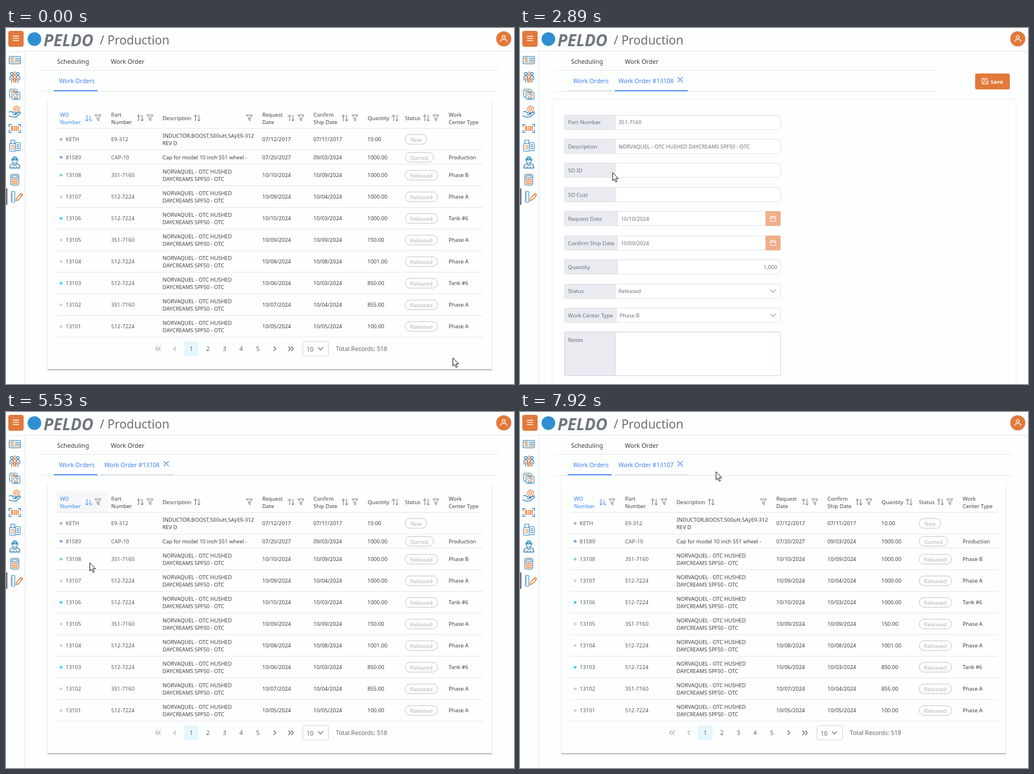
An HTML page that plays this animation: 894 px wide and 626 px high, repeating every 8000 ms.

```html
<!DOCTYPE html>
<html lang="en">
<head>
<meta charset="utf-8">
<title>Production</title>
<style>
html, body { margin: 0; width: 100%; height: 100%; overflow: hidden; background: #fdfefe; }
svg { display: block; width: 894px; height: 626px; font-family: "Noto Sans", "Open Sans", sans-serif; }
text { font-size: 9.4px; fill: #3a4047; }
.brand { font-size: 28.6px; font-weight: 800; font-style: italic; fill: #71757d; }
.title { font-size: 21.2px; fill: #6b6f77; }
.nav { font-size: 10.8px; font-weight: 500; fill: #343b44; }
.tab { font-size: 10.5px; font-weight: 500; fill: #3b82f6; }
.head { font-size: 9.4px; font-weight: 500; fill: #3d444d; }
.sorted { fill: #3b82f6; }
.code { font-size: 9.5px; fill: #565c64; }
.date { font-size: 9.5px; }
.badge { font-size: 9.3px; font-weight: 500; fill: #b0b2b5; }
.page { font-size: 10.6px; fill: #62686f; }
.label { font-size: 9.5px; font-weight: 500; fill: #666d77; }
.value { font-size: 9.3px; font-weight: 300; fill: #6c727a; }
.save { font-size: 9.6px; font-weight: 600; fill: #fff; }
</style>
</head>
<body>
<svg viewBox="0 0 894 626">
  <g id="shell"></g>
  <g id="view"></g>
  <g id="cursor"></g>
</svg>
<script>
const LOOP = 8000;
const BLUE = '#3b82f6', ORANGE = '#e2793b', RULE = '#e5e7ea';
const INK = '#2480ba', WARM = '#e57f3c';

const $ = id => document.getElementById(id);
const text = (x, mid, str, cls = '', extra = '') =>
  `<text x="${x}" y="${mid + 3.5}" class="${cls}" ${extra}>${str}</text>`;
const rect = (x, y, w, h, fill, rx = 0, stroke = 'none') =>
  `<rect x="${x}" y="${y}" width="${w}" height="${h}" rx="${rx}" fill="${fill}" stroke="${stroke}"/>`;
const line = (d, color = RULE, width = 1, fill = 'none') =>
  `<path d="${d}" stroke="${color}" stroke-width="${width}" fill="${fill}" stroke-linecap="round" stroke-linejoin="round"/>`;
const dot = (x, y, r, fill, stroke = 'none') =>
  `<circle cx="${x}" cy="${y}" r="${r}" fill="${fill}" stroke="${stroke}" stroke-width="1.2"/>`;
const at = (x, y, body) => `<g transform="translate(${x} ${y})">${body}</g>`;
const middle = 'text-anchor="middle"';

// Sidebar icons, each centred on 0,0
const person = (x, y, c) => dot(x, y - 6, 2.2, 'none', c) + line(`M${x - 3} 5V${y - 1}q3 -3 6 0V5M${x} 1V9`, c, 1.3);
const icons = [
  rect(-10, -6.5, 20, 13, '#e6f2f9', 1, INK) + dot(-5, -2, 2.2, 'none', WARM) + line('M1 -3H8M1 0H8', INK, 1.2) +
    line('M-7 4l3 -2 3 2M2 4V2M5 4V2M8 4V2', WARM, 1.4),
  person(-5.5, 0, INK) + person(5.5, 0, INK) + person(0, -1, WARM) + line('M-2 9V0M2 9V0', WARM, 1.5),
  rect(-9, -9, 13, 14, 'none', 1, INK) + rect(-5, -4, 14, 13, '#fdfefe', 1, INK) + dot(2, 1, 4, '#fff', WARM) +
    line('M2 -1V1H4M-2 7H6', INK, 1.2) + line('M-7 -6H1', WARM, 1.4),
  dot(3, -4, 5.5, 'none', WARM) + dot(3, -4, 2.4, 'none', WARM) +
    line('M-10 1l4 -1 4 3h4q2 2 -1 3h-4M1 5l7 -4q3 0 1 3l-7 6h-6l-6 -2', INK, 1.4),
  line('M-10 -3V-7H-6M6 -7H10V-3M10 3V7H6M-6 7H-10V3', INK, 1.4) + line('M-6 -4V4M-3.5 -4V4M0 -4V4M3 -4V4M6 -4V4', WARM, 1.7),
  rect(-9, -4, 11, 14, 'none', 1, INK) + rect(-7, -9.5, 7, 6, '#fdfefe', 0, INK) + rect(1, -5, 8.5, 14, '#fdfefe', 1, INK) +
    line('M-6 0H-1M-6 3H-1M-6 6H-1', WARM, 1.4) + line('M3.5 -1H7M3.5 2H7M3.5 5H7', INK, 1.3),
  dot(0, -3, 4.3, 'none', INK) + line('M-6 -5H6M-4 -5q0 -5 4 -5t4 5', INK, 1.4) +
    line('M-8.5 9.5V6q1 -3 5 -4l3.5 3 3.5 -3q4 1 5 4V9.5Z', INK, 1.4) + line('M-3 9V6M3 9V6', WARM, 1.3),
  rect(-7, -9.5, 14, 19, '#fbe9dd', 1.5, INK) + rect(-4.5, -7, 9, 3.5, '#fdfefe', 0, INK) +
    line('M-4 -.5h1m2.5 0h1m2.5 0h1M-4 3h1m2.5 0h1m2.5 0h1M-4 6.5h1m2.5 0h1m2.5 0h1', WARM, 2),
  rect(-6, -9.5, 6, 19, '#fdfefe', .8, INK) + line('M-6 -6h2M-6 -3h3M-6 0h2M-6 3h3M-6 6h2', INK) +
    line('M2 7l1 -4 8 -9 3 2.5 -8 9ZM9 -4l3 2.5', WARM, 1.4)
];

function shell() {
  let s = line('M0 41H894', '#e2e4e7') + line('M33.5 41V626', '#e2e4e7');
  s += rect(4, 5, 27, 28, ORANGE, 4) + line('M12.5 14.5h10M12.5 18.3h10M12.5 22.1h10', '#fff', 1.3);
  s += dot(50, 19.5, 12, '#2f8fd0');
  s += '<text x="66" y="31.5" class="brand">PELDO</text><text x="165" y="29" class="title">/ Production</text>';
  s += dot(876, 19, 13.3, ORANGE) + dot(876, 16, 2.7, 'none', '#fff') +
    line('M870.5 24v-1q0 -2.5 3 -2.5h5q3 0 3 2.5v1', '#fff', 1.2);
  icons.forEach((icon, i) => s += at(15.5, 56.5 + i * 30.03, icon));
  s += rect(0, 282, 2.5, 29, '#6f727b');
  return s + text(90, 59.5, 'Scheduling', 'nav') + text(184.5, 59.5, 'Work Order', 'nav');
}

const cross = (x, y) => line(`M${x - 4} ${y - 4}l8 8m0 -8l-8 8`, BLUE, 1.1);
const bar = (x, w, color) => rect(x, 109.4, w, 1.8, color);

function tabs({ form, open, hover }) {
  const right = form ? 733 : 867;
  const shade = (active, hovered) => active ? BLUE : hovered ? '#5d636d' : '#dcdfe4';
  let s = line(`M62 74.5H${right}M62 111.5H${right}`);
  s += text(93.5, 93.5, 'Work Orders', 'tab') + bar(84, 77, shade(!form, hover === 0));
  open.forEach((id, i) => {
    const x = 167 + i * 133;
    s += text(x + 6, 93.5, 'Work Order #' + id, 'tab') + cross(x + 115, 91) + bar(x, 128, shade(id === form, hover === i + 1));
  });
  return s;
}

const sort = x => line(`M${x - 3} 163.5V153m-2.5 2.5l2.5 -2.5 2.5 2.5M${x + 3} 153v10.5m-2.5 -2.5l2.5 2.5 2.5 -2.5`, '#646b76');
const funnel = x => line(`M${x - 5} 153h10l-3.7 5v5l-2.6 -1.5v-3.5Z`, '#646b76');
const columns = [
  [95, 'WO|Number', 0, 162], [185, 'Part|Number', 236.5, 253.5], [275.5, 'Description', 336.5, 428.5],
  [451, 'Request|Date', 502, 519], [541, 'Confirm|Ship Date', 596.5, 614], [636.5, 'Quantity', 685],
  [702, 'Status', 740, 756.5], [779, 'Work|Center Type']
];

const LOTION = 'NORVAQUEL - OTC HUSHED/DAYCREAMS SPF50 - OTC';
const GOLD = '351-7160', SILVER = '512-7224';
const orders = [
  ['KETH', 'E9-312', 'INDUCTOR,BOOST,500uH,5AýE9-312/REV D', '07/12/2017', '07/11/2017', '10.00', 'New', ''],
  ['81589', 'CAP-10', 'Cap for model 10 inch S51 wheel -', '07/20/2027', '09/03/2024', '1000.00', 'Started', 'Production'],
  ...[
    [GOLD, '10/10', '10/09', '1000.00', 'Phase B'], [SILVER, '10/09', '10/04', '1000.00', 'Phase A'],
    [SILVER, '10/10', '10/03', '1000.00', 'Tank #6'], [GOLD, '10/09', '10/09', '150.00', 'Phase A'],
    [SILVER, '10/08', '10/08', '1001.00', 'Phase A'], [SILVER, '10/06', '10/03', '850.00', 'Tank #6'],
    [GOLD, '10/07', '10/04', '855.00', 'Phase A'], [SILVER, '10/05', '10/05', '100.00', 'Phase A']
  ].map(([part, due, ship, qty, center], i) =>
    [String(13108 - i), part, LOTION, due + '/2024', ship + '/2024', qty, 'Released', center])
];
const dotColor = { '': '#b3b5b6', Production: '#7fa5e2', 'Phase B': '#8fcce2', 'Phase A': '#d0d1ea', 'Tank #6': '#42d0ee' };
const badgeWidth = { New: 38, Started: 50, Released: 57 };

const stack = (x, mid, lines, cls) =>
  lines.map((l, i) => text(x, mid + (i - (lines.length - 1) / 2) * 13, l, cls)).join('');

function row(order, y, h, lit) {
  const [id, part, desc, due, ship, qty, status, center] = order;
  const mid = y + h / 2 + .3, w = badgeWidth[status];
  return (lit ? rect(89, y + .5, 751, h - 1, '#f1f4f7') : '') + dot(97, mid, 2.5, dotColor[center]) +
    text(105, mid, id, 'code') + text(185, mid, part, 'code') + stack(275.5, mid, desc.split('/')) +
    text(451, mid, due, 'date') + text(541, mid, ship, 'date') + text(636, mid, qty, 'date') +
    rect(702.5, mid - 8.5, w, 17, 'none', 8.5, '#c0c2c5') +
    text(702.5 + w / 2, mid + .7, status, 'badge', middle) + text(779, mid, center) +
    line(`M89 ${y + h}H840`);
}

function pager() {
  const chev = (x, dir, c) => line(`M${x - dir * 1.7} 560.5l${dir * 3.5} 3.5 ${-dir * 3.5} 3.5`, c, 1.1);
  let s = rect(313, 551, 26, 26, '#e6f6fe', 2);
  s += [265, 270, 297].map(x => chev(x, -1, '#a2a6ad')).join('') + [473, 499, 504].map(x => chev(x, 1, '#555b64')).join('');
  for (let i = 0; i < 5; i++) s += text(326 + i * 29.3, 564.3, i + 1, 'page', middle);
  s += rect(522.5, 551.5, 45, 25, '#fff', 2, '#cfd3d9') + text(529, 565.5, '10', 'page') + line('M549.5 562l4 4 4 -4', '#6b7280', 1.2);
  return s + text(580.5, 564.3, 'Total Records: 518', 'page');
}

function list({ lit, shade }) {
  let s = line('M72.5 125V600M855.5 125V600', '#e6e8eb') + line('M73.5 601H855', '#a3a6ab', 1.3);
  if (shade) s += rect(89, 139, 91, 37, '#f6f7f9');
  columns.forEach(([x, name, sorter, filter], i) => {
    s += stack(x, 158.5, name.split('|'), i ? 'head' : 'head sorted');
    if (sorter) s += sort(sorter);
    if (filter) s += funnel(filter);
  });
  s += line('M142.5 153v10.5m-2.5 -2.5l2.5 2.5 2.5 -2.5M147 155.5h1M147 158h2M147 160.5h3M147 163h4.5', BLUE);
  s += line('M89 176.5H840');
  let y = 176.5;
  orders.forEach((order, i) => {
    const h = i === 1 ? 25 : 38;
    s += row(order, y, h, order[0] === lit);
    y += h;
  });
  return s + pager();
}

function form(id) {
  const [, part, desc, due, ship, , status, center] = orders.find(o => o[0] === id);
  const fields = [
    ['Part Number', part], ['Description', desc.replace('/', ' ')], ['SO ID', ''], ['SO Cust', ''],
    ['Request Date', due, 'date'], ['Confirm Ship Date', ship, 'date'], ['Quantity', '1,000', 'number'],
    ['Status', status, 'pick'], ['Work Center Type', center, 'pick']
  ];
  let s = line('M56.5 626V128q0 -3 3 -3H870q3 0 3 3V626', '#eceef0');
  s += rect(801, 80, 61, 28, ORANGE, 3) + text(828, 94.5, 'Save', 'save') +
    line('M813.5 88.5h7.5l2.5 2.5v7.5h-10ZM816 88.5v3h4v-3M815.5 98.5v-4h6v4', '#fff');
  fields.forEach(([name, value, kind], i) => {
    const mid = 165.5 + i * 42.45, top = Math.round(mid - 13) + .5;
    const split = kind === 'date' || kind === 'number' ? 171.5 : i === 8 ? 169.5 : 167.5;
    s += rect(78.5, top, 380, 25, '#fff', 3, '#e0e3e8') + rect(78.5, top, split - 78.5, 25, '#e9ebf0', 2, '#d8dce3');
    s += text(84.5, mid + .3, name, 'label');
    s += kind === 'number' ? text(452.5, mid + .3, value, 'value', 'text-anchor="end"')
      : text(split + 6, mid + .3, value, 'value');
    if (kind === 'pick') s += line(`M441 ${mid - 2.3}l4.5 4.5 4.5 -4.5`, '#9299a3', 1.2);
    if (kind === 'date') s += rect(432, top - .5, 26.5, 26, '#efae88', 2) +
      at(445.5, mid, line('M-4.5 -3.5h9v8h-9ZM-4.5 -1h9M-2.3 -5v2M2.3 -5v2', '#fff'));
  });
  s += rect(78.5, 534.5, 380, 77, '#fff', 3, '#cdd1d8') + rect(78.5, 534.5, 89, 77, '#e9ebf0', 2, '#cdd1d8');
  return s + text(84.5, 548, 'Notes', 'label');
}

// Screen state from each time on
const states = [
  [0, { open: [] }],
  [2650, { open: [], lit: '13108' }],
  [2770, { open: ['13108'], form: '13108' }],
  [4310, { open: ['13108'], form: '13108', hover: 0 }],
  [4570, { open: ['13108'] }],
  [4850, { open: ['13108'], shade: true }],
  [6210, { open: ['13108'], shade: true, lit: '13107' }],
  [6360, { open: ['13107', '13108'], form: '13107' }],
  [7230, { open: ['13107', '13108'], form: '13107', hover: 2 }],
  [7920, { open: ['13107'] }]
];

// Pointer: time, x, y, hand
const pointer = [
  [0, 786.5, 580.5], [1520, 748.5, 464.5], [1670, 473, 16], [1800, 338.5, 88.5], [1950, 225, 170],
  [2070, 167.5, 239], [2220, 163, 260], [2370, 163, 254.5], [3750, 149, 190], [3880, 129.5, 102.5],
  [4030, 100, 70], [4160, 79.5, 46.5], [4310, 122, 104, 1], [4850, 126, 150], [4980, 140, 210],
  [5110, 147, 259], [5270, 146.5, 261], [5400, 147, 263.5], [5530, 147.5, 265.5], [5810, 148, 281],
  [5950, 150, 295], [6210, 150, 296.5], [7070, 352, 136], [7230, 428, 80.5], [7360, 420, 84, 1],
  [7490, 413, 97, 1], [7630, 416, 92, 1], [7760, 415, 90, 1], [7920, 345, 105.5]
];
const arrow = line('M0 0V14L3.2 11 5.4 16.3 7.7 15.4 5.5 10.2H9.7Z', '#111', 1, '#fff');
const hand = line('M-1.7 1.5Q0 -.8 1.7 1.5V7q1.6 -1 2.5 .4 1.6 -.8 2.5 .6 2 -.4 2.3 1.5V14q0 2 -1.5 3.5V19.5H-1.5V17.5L-5 12.5q-.8 -2 1 -2l2.3 2ZM1.7 7v3.5M4.2 7.5v3M6.7 8v2.5', '#111', 1, '#fff');

const current = (keys, t) => keys.findLast(k => k[0] <= t);
let shown;

function draw(t) {
  const [, state] = current(states, t);
  if (state !== shown) {
    shown = state;
    $('view').innerHTML = tabs(state) + (state.form ? form(state.form) : list(state));
  }
  const [, x, y, over] = current(pointer, t);
  $('cursor').innerHTML = at(x, y, over ? hand : arrow);
}

function tick() {
  draw(performance.now() % LOOP);
  requestAnimationFrame(tick);
}

$('shell').innerHTML = shell();
tick();
</script>
</body>
</html>
```
